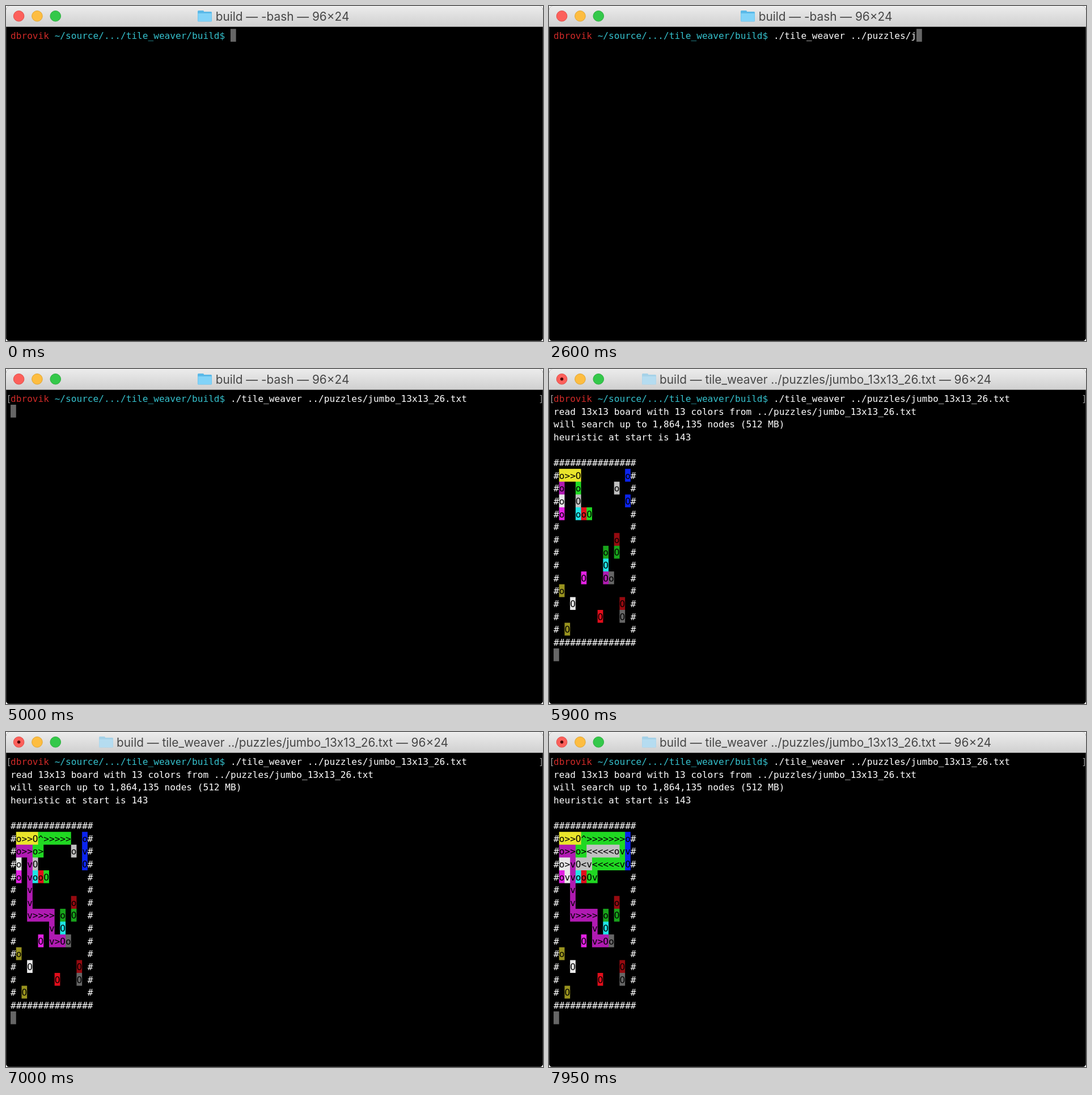
Recreate the animation shown at these times as an HTML page with a canvas. Size 947x591 px, loop 8000 ms.

```html
<!DOCTYPE html>
<html>
<head>
<meta charset="utf-8">
<style>
  html, body { margin: 0; width: 100%; height: 100%; overflow: hidden; background: #fff; }
  canvas { display: block; }
</style>
</head>
<body>
<canvas id="stage" width="947" height="591"></canvas>
<script>
const ctx = document.getElementById('stage').getContext('2d');
const W = 947, H = 591, LOOP = 8000;
// the window is 586 points wide, with character cells of 6 by 14 points
const PT = W / 586, LEFT = 5 * PT, TOP = 25 * PT, CW = 6 * PT, RH = 14 * PT;
const MONO = '16.1px "DejaVu Sans Mono", "Noto Sans Mono", monospace';
const SANS = '20.8px Inter, Roboto, sans-serif';

const APP = 'tile_weaver';
const USER = 'dbrovik';
const FILE = '../puzzles/jumbo_13x13_26.txt';
const PROMPT = ` ~/source/.../${APP}/build$ `;
const COMMAND = `./${APP} ${FILE} `;

// [time, characters typed]; the jumps are tab completions
const TYPED = [
  [650, 1], [700, 2], [1250, 3], [1300, 4], [1400, 14],
  [1700, 15], [1750, 16], [1850, 17], [1950, 18], [2050, 19], [2150, 25],
  [2600, 26], [2800, 27], [3050, 32], [3300, 33], [3450, 44]
];
const ENTER = 5000, OUTPUT = 5050, SOLVE = 5850, STEP = 50;

const COLORS = {
  y: '#e9e52b', b: '#0b24ee', p: '#b01ab2', g: '#20d822', l: '#c0c0c0',
  w: '#e8e8e8', m: '#e321e3', c: '#1fe4e6', r: '#e20d1b', d: '#960a10',
  n: '#18a31b', k: '#666', o: '#99931f'
};

// lower case starts a path, upper case ends it
const BOARD = [
  'y  Y        b', 'p  g      l', 'w  L        B', 'm  crG', '',
  '          d', '        n N', '        C', '    M   Pk', 'o',
  '  W        D', '       R   K', ' O'
];
const PATHS = [
  ['y', '>>'], ['b', 'v'], ['p', '>>vvvvv>>>>vv>'],
  ['g', '>^>>>>>>>vv<<<<<v'], ['l', '<<<<<v<'], ['w', '>v']
];
const DIRS = { '>': [1, 0], '<': [-1, 0], 'v': [0, 1], '^': [0, -1] };

const ends = BOARD.flatMap((row, y) => [...row].map((k, x) => {
  const key = k.toLowerCase();
  return { x, y, ch: k === key ? 'o' : 'O', key };
})).filter(c => c.key !== ' ');

const moves = PATHS.flatMap(([key, path]) => {
  let { x, y } = ends.find(c => c.key === key && c.ch === 'o');
  return [...path].map(ch => {
    x += DIRS[ch][0];
    y += DIRS[ch][1];
    return { x, y, ch, key };
  });
});

function print(text, col, row, color = '#fff') {
  ctx.font = MONO;
  ctx.fillStyle = color;
  [...text].forEach((ch, i) => ctx.fillText(ch, LEFT + (col + i) * CW, TOP + row * RH + 17.5));
}

// added light keeps the shared edges of neighbouring cells free of seams
function block(col, row, color) {
  ctx.globalCompositeOperation = 'lighter';
  ctx.fillStyle = color;
  ctx.fillRect(LEFT + col * CW, TOP + row * RH, CW, RH);
  ctx.globalCompositeOperation = 'source-over';
}

function disc(x, y, r, fill, edge) {
  ctx.beginPath();
  ctx.arc(x, y, r, 0, 7);
  ctx.fillStyle = fill;
  ctx.fill();
  if (!edge) return;
  ctx.strokeStyle = edge;
  ctx.lineWidth = 0.9;
  ctx.stroke();
}

function folder(x, back, front) {
  ctx.fillStyle = back;
  ctx.beginPath();
  ctx.roundRect(x, 8, 11, 8, 1.5);
  ctx.roundRect(x, 10, 25, 17.5, 1.5);
  ctx.fill();
  ctx.fillStyle = front;
  ctx.fillRect(x + 0.5, 13, 24, 14);
}

function titleBar(running) {
  const shade = ctx.createLinearGradient(0, 0, 0, 36);
  shade.addColorStop(0, '#ececec');
  shade.addColorStop(1, '#d0d0d0');
  ctx.fillStyle = shade;
  ctx.fillRect(0, 0, W, 36);
  ctx.fillStyle = '#f6f6f6';
  ctx.fillRect(0, 0, W, 1);
  ctx.fillStyle = '#8e8e8e';
  ctx.fillRect(0, 36, W, 1);

  const lights = [['#fc605b', '#e0443f'], ['#fdbd41', '#dfa023'], ['#34c84a', '#22a935']];
  lights.forEach(([fill, edge], i) => disc((14 + 20 * i) * PT, 11 * PT, 9.3, fill, edge));
  if (running) disc(14 * PT, 11 * PT, 2.7, '#4d0000');

  if (running) folder(164, '#a6d2e8', '#b5dcf0');
  else folder(338, '#5bb9e8', '#82d3f8');
  ctx.font = SANS;
  ctx.fillStyle = '#464646';
  ctx.textAlign = 'center';
  ctx.fillText(`build — ${running ? `${APP} ${FILE}` : '-bash'} — 96×24`, 487.5, 26);
  ctx.textAlign = 'left';
}

function output(t) {
  print(`read 13x13 board with 13 colors from ${FILE}`, 0, 1);
  print('will search up to 1,864,135 nodes (512 MB)', 0, 2);
  print('heuristic at start is 143', 0, 3);
  const wall = '#'.repeat(15);
  print(wall, 0, 5);
  print(wall, 0, 19);
  BOARD.forEach((row, y) => {
    print('#', 0, y + 6);
    print('#', 14, y + 6);
  });
  const count = Math.max(0, Math.floor((t - SOLVE) / STEP) + 1);
  const cells = [...ends, ...moves.slice(0, count)];
  cells.forEach(c => block(c.x + 1, c.y + 6, COLORS[c.key]));
  cells.forEach(c => print(c.ch, c.x + 1, c.y + 6, '#000'));
}

function draw(t) {
  ctx.clearRect(0, 0, W, H);
  ctx.save();
  ctx.beginPath();
  ctx.roundRect(0, 0, W, H, [7, 7, 6, 6]);
  ctx.clip();
  ctx.fillStyle = '#000';
  ctx.fillRect(0, 0, W, H);
  ctx.fillStyle = '#333';
  ctx.fillRect(0, 37, 1, H);
  ctx.fillRect(W - 1, 37, 1, H);
  ctx.fillRect(0, H - 1, W, 1);
  titleBar(t >= OUTPUT);

  const typed = TYPED.reduce((n, [at, len]) => t >= at ? len : n, 0);
  const start = USER.length + PROMPT.length;
  print(USER, 0, 0, '#d02a28');
  print(PROMPT, USER.length, 0, '#35c1cd');
  print(COMMAND.slice(0, typed), start, 0);

  if (t < ENTER) {
    block(start + typed, 0, '#666');
  } else {
    print('[', -0.8, 0, '#999');
    print(']', 96, 0, '#999');
    block(0, t < OUTPUT ? 1 : 20, '#666');
  }
  if (t >= OUTPUT) output(t);
  ctx.restore();
}

const begin = performance.now();
function tick() {
  draw((performance.now() - begin) % LOOP);
  requestAnimationFrame(tick);
}
tick();
</script>
</body>
</html>
```
